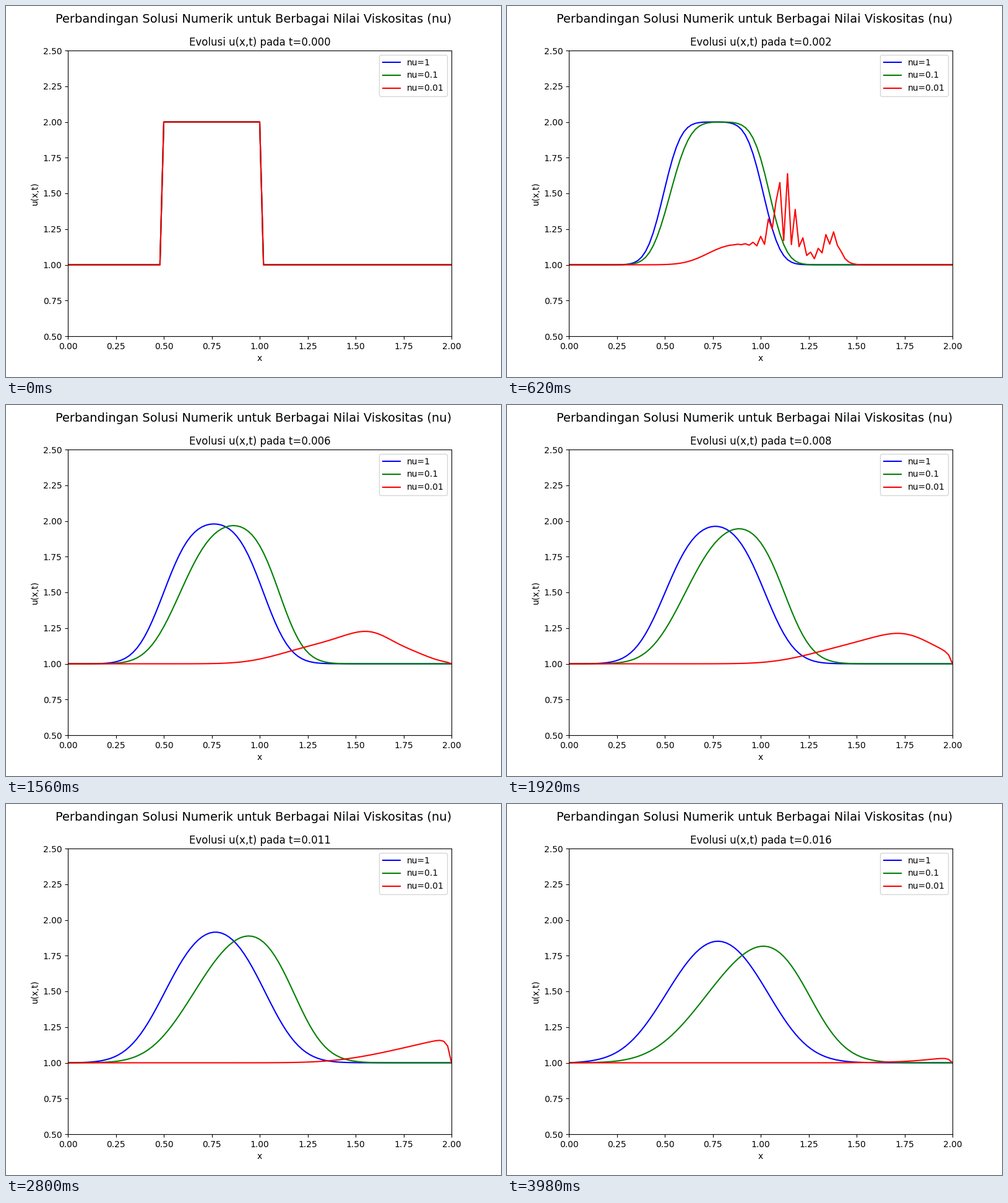
Animation of 800 by 600 pixels, one loop 4 s. Source, as a matplotlib script:

```python
import numpy as np
import matplotlib.pyplot as plt
from matplotlib.animation import FuncAnimation

NX, STEPS, SIGMA = 101, 200, 0.2
DX = 2 / (NX - 1)
CASES = [(1, "blue"), (0.1, "green"), (0.01, "red")]
x = np.linspace(0, 2, NX)


def time_step(nu):
    return SIGMA * DX**2 / nu


def solve_burgers(nu):
    """Explicit upwind convection with central diffusion, fixed ends."""
    dt = time_step(nu)
    u = np.ones(NX)
    u[25:51] = 2
    history = [u]
    for _ in range(STEPS - 1):
        left, mid, right = u[:-2], u[1:-1], u[2:]
        new = u.copy()
        new[1:-1] = (mid - mid * dt / DX * (mid - left)
                     + nu * dt / DX**2 * (right - 2 * mid + left))
        u = new
        history.append(u)
    return history


solutions = [solve_burgers(nu) for nu, _ in CASES]

fig, ax = plt.subplots(figsize=(8, 6), dpi=100)
fig.suptitle("Perbandingan Solusi Numerik untuk Berbagai Nilai Viskositas (nu)",
             fontsize=14)
lines = [ax.plot(x, sol[0], color=color, label=f"nu={nu}")[0]
         for (nu, color), sol in zip(CASES, solutions)]
ax.set(xlim=(0, 2), ylim=(0.5, 2.5), xlabel="x", ylabel="u(x,t)")
ax.legend(loc="upper right")
title = ax.set_title("")


def update(n):
    for line, sol in zip(lines, solutions):
        line.set_ydata(sol[n])
    title.set_text(f"Evolusi u(x,t) pada t={n * time_step(1):.3f}")
    return [*lines, title]


anim = FuncAnimation(fig, update, frames=STEPS, interval=20,
                     repeat=True, repeat_delay=0, blit=False)
plt.show()
```
